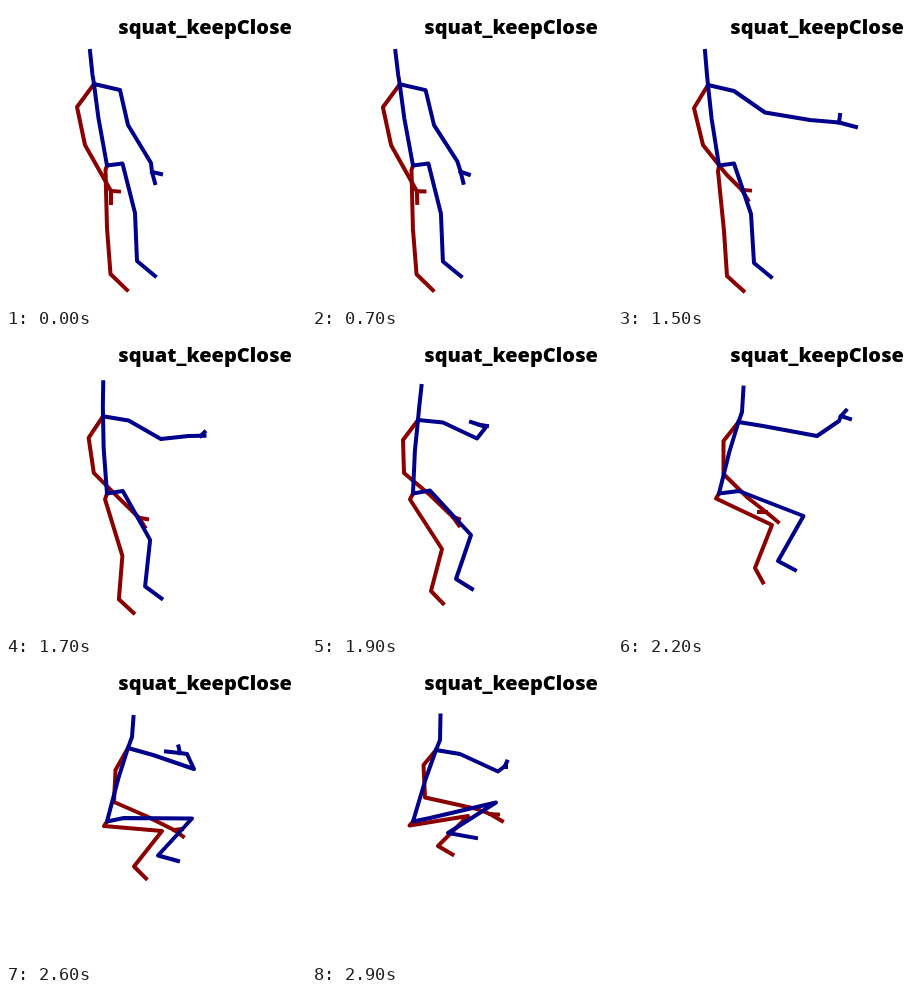
Recreate the animation shown at these times as an HTML page with a canvas. Size 300 by 300 pixels, loop 3 s.

```html
<!DOCTYPE html>
<html lang="en">
<head>
<meta charset="utf-8">
<title>Squat skeleton</title>
<style>
  html, body { margin: 0; width: 100%; height: 100%; overflow: hidden; background: #fff; }
  canvas { display: block; width: 300px; height: 300px; }
</style>
</head>
<body>
<canvas id="stage" width="300" height="300"></canvas>
<script>
const ctx = document.getElementById('stage').getContext('2d');
const BLUE = '#00008b', RED = '#8b0000';
const LOOP = 3000, HOLD = 700, STEP = 100;
const TITLE = 'squat_keepClose';
const TITLE_WIDTH = 174;

// Steps at which every joint has a key position
const keys = [0, 5, 9, 13, 16, 20, 23];

function slope(values, i) {
  const a = Math.max(i - 1, 0), b = Math.min(i + 1, keys.length - 1);
  return (values[b] - values[a]) / (keys[b] - keys[a]);
}

// Cubic Hermite curve through the key values
function curve(values, step) {
  let i = 0;
  while (i < keys.length - 2 && step >= keys[i + 1]) i++;
  const span = keys[i + 1] - keys[i];
  const u = (step - keys[i]) / span, v = 1 - u;
  return v * v * (1 + 2 * u) * values[i] + u * u * (3 - 2 * u) * values[i + 1]
    + span * u * v * (v * slope(values, i) - u * slope(values, i + 1));
}

const track = (xs, ys) => step => [curve(xs, step), curve(ys, step)];

const head = track([84, 81.5, 87, 109.5, 125.5, 127.5, 128.5], [45, 45, 45, 52, 53.5, 55, 53.5]);
const neck = track([86.5, 85.5, 89, 107, 124, 126, 128], [69, 69, 69, 75, 78, 75, 78]);
const chest = track([88, 87, 90, 106, 120.5, 122, 124], [78, 79, 79, 86, 88, 86, 88]);
const pelvis = () => [101, 159.5];

const leftHip = track([116.5, 116, 116, 118, 121, 118, 118], [157.5, 157.5, 157.5, 156.5, 157, 156, 156]);
const leftKnee = track([129, 129, 133, 159, 185.5, 186, 184], [207, 209, 208, 201, 182, 156.5, 140.5]);
const leftAnkle = track([131, 131, 136, 144, 160, 152, 136], [255, 257, 257, 245, 227, 193.5, 171]);
const leftToe = track([149, 149, 153, 160, 177, 172, 164], [270, 271, 271, 255, 236, 199, 176]);

const leftShoulder = track([114, 112.5, 116, 131, 145, 147, 148], [84, 84.5, 85, 88.5, 92, 93, 92]);
const leftElbow = track([122, 124, 147, 165, 199, 188, 186], [119, 118.5, 106.5, 104.5, 102, 107, 109.5]);
const leftWrist = track([145, 150, 192, 174, 221, 181, 193], [157, 147, 114, 93, 87, 92, 104]);
const leftPalm = track([146, 163, 221, 168, 223, 174, 194], [166, 161, 116.5, 91, 82, 91, 102]);
const leftThumb = track([155, 168, 222, 175, 228, 172.5, 195], [168, 166, 109, 92, 76.5, 84.5, 99.5]);
const leftFinger = track([149, 166, 238, 159, 232, 160, 194], [177, 172, 121, 88, 85, 89.5, 105]);

const rightHip = track([99.5, 99.5, 100, 98, 98, 98, 97.5], [164, 165, 165, 165.5, 164.5, 164, 163.5]);
const rightKnee = track([101, 101, 106, 130, 154, 156, 156], [222, 225, 225, 215, 191, 169, 154]);
const rightAnkle = track([104.5, 105, 109, 119, 137, 128, 126], [268, 269, 270, 257, 234, 204.5, 184]);
const rightToe = track([121, 121, 125.5, 131, 145, 140, 140.5], [284, 285, 285, 269.5, 248.5, 216.5, 192.5]);

const rightShoulder = track([71, 71, 76, 91, 105.5, 109.5, 111.5], [101, 102, 102, 106, 107, 108, 103]);
const rightElbow = track([79, 80, 85, 92, 105.5, 108, 113], [139, 140, 139, 139, 140, 140, 135.5]);
const rightWrist = track([101, 102, 108, 118, 130, 140, 165], [178, 179, 168, 161, 164, 154, 147]);
const rightPalm = track([105, 106, 124, 141, 148, 168, 178], [185, 186, 184, 183, 178, 168, 152]);
const rightThumb = track([113, 112, 132, 147, 141, 176, 186], [185.5, 185, 184.5, 185, 178, 167, 152.5]);
const rightFinger = track([105, 108, 130, 147, 160, 177, 190], [197, 196, 194, 191.5, 188, 174.5, 159]);

// Spine bends slightly backwards at its middle
function spine(step) {
  const [x, y] = chest(step), [px, py] = pelvis();
  return [x + (px - x) * 0.42 - 1, y + (py - y) * 0.42];
}

const limbs = [
  [RED, chest, rightShoulder, rightElbow, rightWrist, rightPalm, rightFinger],
  [RED, rightPalm, rightThumb],
  [RED, pelvis, rightHip, rightKnee, rightAnkle, rightToe],
  [BLUE, head, neck, chest, spine, pelvis, leftHip, leftKnee, leftAnkle, leftToe],
  [BLUE, chest, leftShoulder, leftElbow, leftWrist, leftPalm, leftFinger],
  [BLUE, leftPalm, leftThumb]
];

function titleFont(size) {
  return `900 extra-condensed ${size}px Impact, "Open Sans", "Noto Sans", "Liberation Sans", sans-serif`;
}

function drawTitle() {
  ctx.font = titleFont(100);
  const size = 100 * TITLE_WIDTH / ctx.measureText(TITLE).width;
  ctx.font = titleFont(size);
  ctx.fillStyle = '#000';
  ctx.fillText(TITLE, 112, 28);
}

function drawLimb([color, ...joints], step) {
  ctx.strokeStyle = color;
  ctx.beginPath();
  for (const joint of joints) ctx.lineTo(...joint(step));
  ctx.stroke();
}

function render() {
  const time = performance.now() % LOOP;
  const step = time < HOLD ? 0 : Math.floor((time - HOLD) / STEP) + 1;
  ctx.fillStyle = '#fff';
  ctx.fillRect(0, 0, 300, 300);
  ctx.lineWidth = 4;
  ctx.lineCap = 'square';
  ctx.lineJoin = 'round';
  for (const limb of limbs) drawLimb(limb, step);
  drawTitle();
  requestAnimationFrame(render);
}
render();
</script>
</body>
</html>
```
